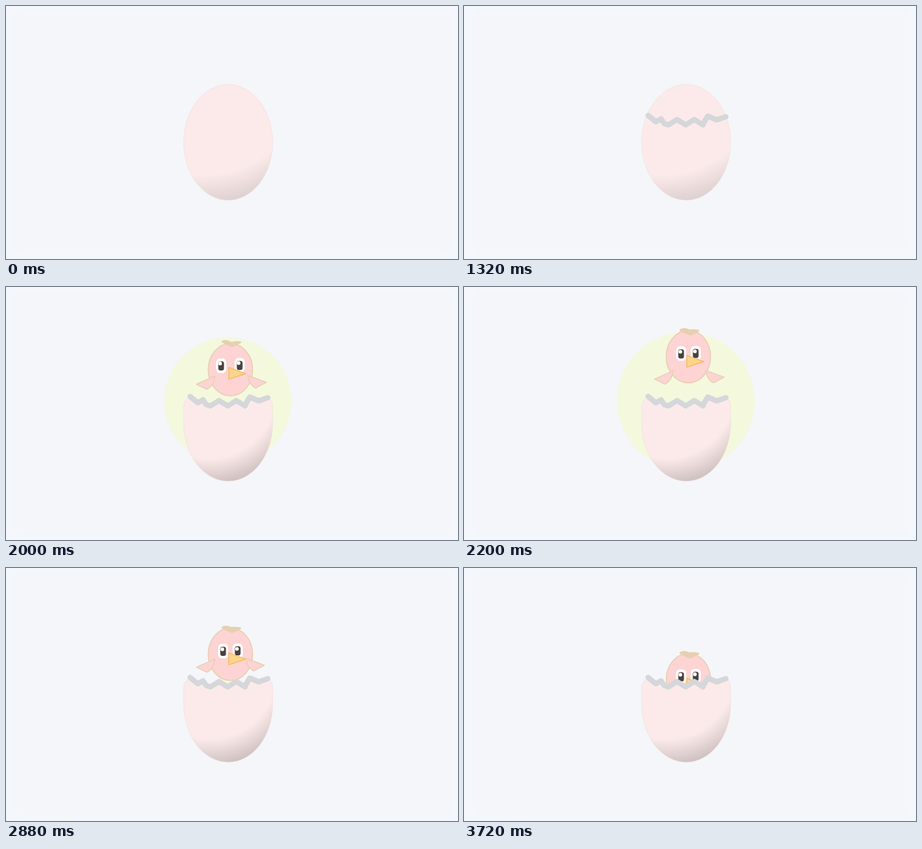
Recreate the animation shown at these times as an HTML page with a canvas. Size 712 by 400 pixels, loop 3760 ms.

```html
<!DOCTYPE html>
<html lang="en">
<head>
<meta charset="utf-8">
<title>Hatching egg</title>
<style>
html, body { margin: 0; width: 100%; height: 100%; overflow: hidden; background: #f4f7fc; }
canvas { display: block; }
</style>
</head>
<body>
<canvas id="stage" width="712" height="400"></canvas>
<script>
const ctx = document.getElementById('stage').getContext('2d');
const LOOP = 3760, STEP = 40, HATCH = 1800, PEAK = 2500, REST = 3360;

const TAN = '#e6d0b0', SKIN = '#fdd3d3', SHELL = '#fceaea';
const EGG = { x: 350, y: 215.5, rx: 70, ry: 91.5 };

const leftCrack = [[290, 173], [302, 183], [310.5, 178.5], [315.5, 186]];
const rightCrack = [[378, 184], [384, 174], [398, 180], [412.5, 175]];
const middleCrack = Array.from({ length: 5 }, (_, i) => [322 + 13.6 * i, i % 2 ? 179.5 : 188]);
const fullCrack = [...leftCrack, ...middleCrack, ...rightCrack];

// Progress from 0 to 1 between two times
const ramp = (t, from, to) => Math.min(1, Math.max(0, (t - from) / (to - from)));
const easeOut = u => 1 - (1 - u) ** 3;

const headTop = t => 135 - 72 * easeOut(ramp(t, HATCH, PEAK)) + 72 * ramp(t, PEAK, REST);
const glowSize = t => 83 + 31 * ramp(t, HATCH, 2160) - 114 * ramp(t, 2160, 2990);

function trace(points) {
  ctx.beginPath();
  points.forEach(([x, y]) => ctx.lineTo(x, y));
}

function paint(fill, stroke, width) {
  if (fill) { ctx.fillStyle = fill; ctx.fill(); }
  if (stroke) { ctx.strokeStyle = stroke; ctx.lineWidth = width; ctx.stroke(); }
}

function oval(x, y, rx, ry = rx) {
  ctx.beginPath();
  ctx.ellipse(x, y, rx, ry, 0, 0, Math.PI * 2);
}

function box(x, y, w, h, r, fill) {
  ctx.beginPath();
  ctx.roundRect(x - w / 2, y - h / 2, w, h, r);
  paint(fill);
}

function background() {
  ctx.fillStyle = '#f4f7fc';
  ctx.fillRect(0, 0, 712, 400);
  ctx.save();
  ctx.shadowColor = '#f4f6f9';
  ctx.shadowBlur = 10;
  box(358, 199, 676, 374, 12, '#f4f6f9');
  ctx.restore();
}

function shade(x, y, r0, r1, tone) {
  const g = ctx.createRadialGradient(x, y, r0, x, y, r1);
  g.addColorStop(0, SHELL);
  g.addColorStop(1, tone);
  return g;
}

function wholeEgg() {
  oval(EGG.x, EGG.y, EGG.rx, EGG.ry);
  paint(shade(310, 100, 167, 214, '#dccfcf'), '#ecdcd6', 0.6);
}

// Lower shell: half an oval with upright sides and rounded shoulders
function cup() {
  const left = EGG.x - EGG.rx, right = EGG.x + EGG.rx;
  ctx.beginPath();
  ctx.ellipse(EGG.x, EGG.y, EGG.rx, EGG.ry, 0, 0, Math.PI);
  ctx.lineTo(left, 190);
  ctx.quadraticCurveTo(left, 179, 288, 176);
  fullCrack.forEach(([x, y]) => ctx.lineTo(x, y));
  ctx.quadraticCurveTo(right, 178, right, 190);
  ctx.closePath();
  paint(shade(320, 165, 106, 148, '#cdbfbf'), '#ecdcd6', 0.6);
}

function crack(points) {
  trace(points);
  paint(null, '#d5d7da', 8.5);
}

function wing(root, tip, low, neck) {
  ctx.beginPath();
  ctx.moveTo(...root);
  ctx.lineTo(...tip);
  ctx.lineTo(...low);
  ctx.quadraticCurveTo(...neck, ...root);
  ctx.closePath();
  paint(SKIN, TAN, 1.5);
}

function eye(x, y, open) {
  box(x, y, 16, 23, 6, '#fff');
  box(x, y + 0.3, 9, 14.5, 3.5, '#4b403d');
  oval(x - 1.2 - open, y - 3 - open, 2.9);
  paint('#fff');
}

// The two curls flatten as the head rises
function tuft(open) {
  const up = 5 * open;
  ctx.beginPath();
  ctx.moveTo(341, -0.5 - up);
  ctx.quadraticCurveTo(346, -4 - up, 355, -up / 4);
  ctx.quadraticCurveTo(362, -1 - up, 369, 0.5 - up);
  ctx.quadraticCurveTo(363, 4 - up, 356, 6.5 - up);
  ctx.quadraticCurveTo(349, 4 - up, 341, -0.5 - up);
  paint(TAN, TAN, 3);
}

function chick(t) {
  const open = 1 - ramp(t, HATCH, 2160);
  ctx.save();
  ctx.translate(0, headTop(t));

  oval(353.5, 41.5, 35, 41.5);
  paint(SKIN, TAN, 1.6);

  ctx.save();
  ctx.translate(0, -28 * open - 15 * ramp(t, PEAK, 2880));
  wing([329, 64], [300, 77], [316.5, 85], [328, 79]);
  ctx.translate(-3 * ramp(t, 2200, 2880), 0);
  wing([381, 63], [410, 74], [393, 83], [382, 77]);
  ctx.restore();

  tuft(open);
  ctx.translate(0, -3.5 * open);
  eye(342 - 7 * open, 36.7, open);
  eye(365 + 7 * open, 36, open);
  trace([[351, 39.5], [377.5, 49.3], [351, 58]]);
  ctx.closePath();
  paint('#fdd58a', '#f3ba62', 1.4);
  ctx.restore();
}

function draw(t) {
  background();
  if (t < HATCH) wholeEgg();
  else {
    oval(349.5, 180, glowSize(t));
    paint('#f4f8dd');
    chick(t);
    cup();
  }
  if (t >= 1320) crack(fullCrack);
  else {
    if (t >= 400) crack(leftCrack);
    if (t >= 800) crack(rightCrack);
  }
}

ctx.lineCap = ctx.lineJoin = 'round';
const start = performance.now();

function tick() {
  const t = (performance.now() - start) % LOOP;
  draw(Math.floor(t / STEP) * STEP);
  requestAnimationFrame(tick);
}
tick();
</script>
</body>
</html>
```
